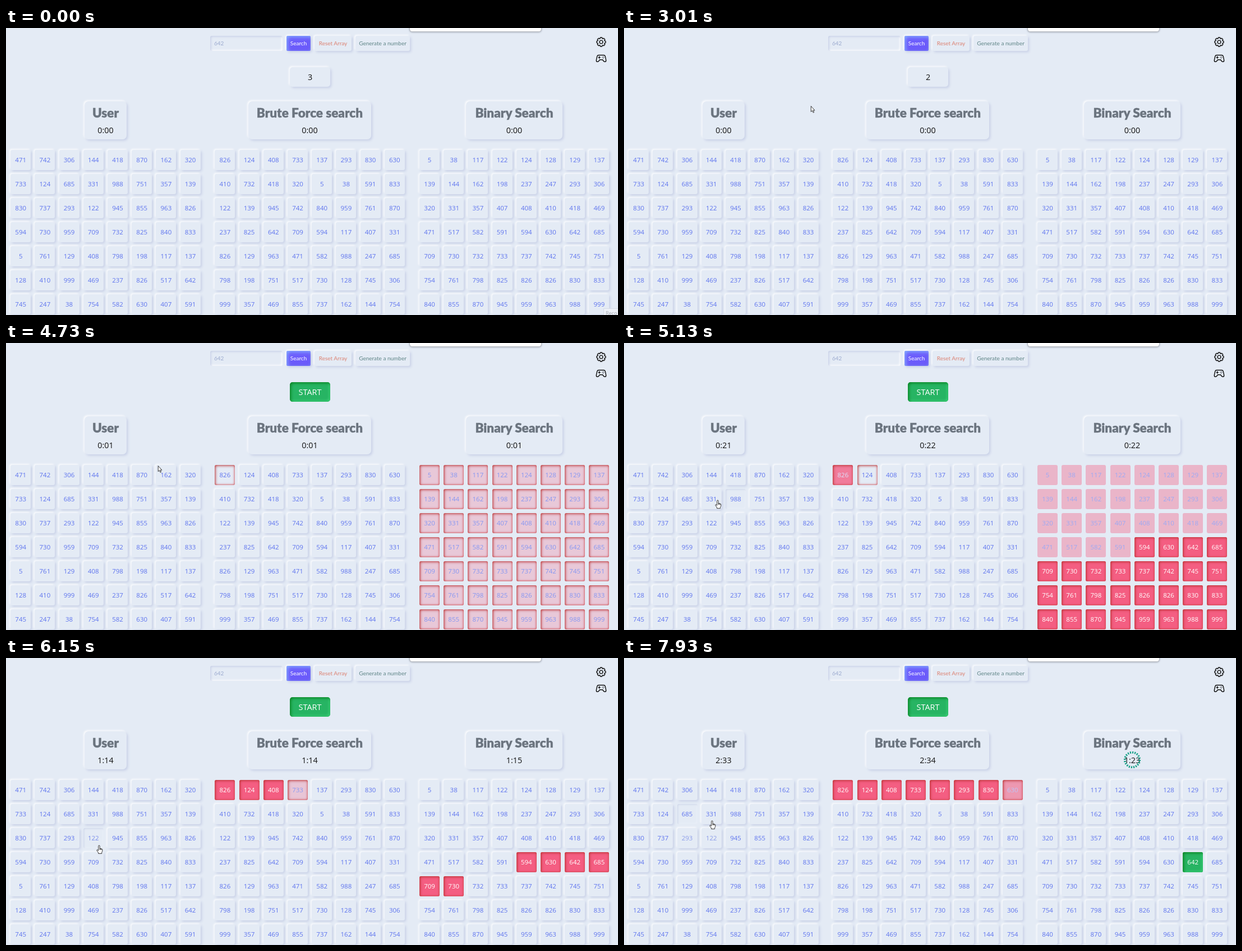
An HTML page for the animation above (7.99 s loop, 1091x513 px).

```html
<!DOCTYPE html>
<html lang="en">
<head>
<meta charset="utf-8">
<title>Search race</title>
<style>
  :root {
    --base: #e4ebf5;
    --raised: 2.2px 2.2px 4.3px #c8d0e7, -1.5px -1.5px 3.6px #fff;
    --sunk: inset 1.5px 1.5px 3.6px #c8d0e7, inset -1.5px -1.5px 3.6px #fff;
    --pressed: inset 1px 1px 3px #cdd5e9, inset -1px -1px 3px #eef3fa;
    --red: inset 1.5px 1.5px 4px rgba(184, 48, 47, .85), inset -1px -1px 3.5px rgba(214, 74, 80, .65);
    --green: inset 1.8px 1.8px 5px #08801f, inset -1.5px -1.5px 4px #43d982;
  }
  html, body { margin: 0; width: 100%; height: 100%; overflow: hidden; background: var(--base); }
  #stage {
    position: relative; width: 1091px; height: 513px; overflow: hidden;
    background: var(--base); font-family: "Open Sans", "Noto Sans", sans-serif;
  }
  #stage > * { position: absolute; box-sizing: border-box; }
  .btn {
    top: 14px; height: 27px; border-radius: 3px; text-align: center;
    font: 10px/27px Lato, "Open Sans", sans-serif; box-shadow: var(--raised);
  }
  #input { left: 364px; width: 129px; padding-left: 7px; text-align: left; color: #9baacf; box-shadow: var(--sunk); }
  #search { left: 500px; width: 43px; color: #fff; }
  #reset { left: 550px; width: 66px; color: #dc8272; }
  #gen { left: 623px; width: 97px; color: #5f8587; }
  #count {
    left: 506px; top: 70px; width: 72px; height: 35px; border-radius: 5px;
    font-size: 14.4px; line-height: 36px; text-align: center; color: #111;
  }
  .card { top: 131px; height: 68px; border-radius: 7px; text-align: center; box-shadow: var(--raised); }
  .card b {
    display: block; height: 42px; white-space: nowrap; color: #6b747f;
    font: 900 22.5px/41px Lato, "Open Sans", sans-serif; -webkit-text-stroke: .4px #6b747f;
  }
  .card span { display: block; font-size: 14.3px; line-height: 20px; color: #111; }
  .cell {
    width: 36px; height: 36px; border-radius: 3px; text-align: center;
    font-size: 11.5px; line-height: 35.5px;
  }
  #bar {
    left: 719px; top: -10px; width: 236px; height: 17px; background: #fff;
    border: 1px solid #b5b9c0; border-radius: 5px; box-shadow: 0 1px 3px #a9b0bb;
  }
  #tip {
    left: 1065px; top: 501px; width: 30px; height: 20px; padding-left: 3px;
    background: #edf1f8; border: 1px solid #d5dbe5; color: #a3a8b0; font-size: 9px; line-height: 16px;
  }
  svg { left: 0; top: 0; overflow: visible; }
</style>
</head>
<body>
<div id="stage">
  <div id="bar"></div>
  <div class="btn" id="input">642</div>
  <div class="btn" id="search">Search</div>
  <div class="btn" id="reset">Reset Array</div>
  <div class="btn" id="gen">Generate a number</div>
  <div id="count">3</div>
  <div class="card" style="left:140px;width:75px"><b>User</b><span></span></div>
  <div class="card" style="left:432px;width:219px"><b>Brute Force search</b><span></span></div>
  <div class="card" style="left:820px;width:172px"><b>Binary Search</b><span></span></div>
  <div id="tip">Reco</div>
  <svg width="1091" height="513" fill="none">
    <g stroke="#111" stroke-width="1.4" stroke-linejoin="round" stroke-linecap="round">
      <path id="gear"/>
      <circle cx="1061" cy="25" r="2.9"/>
      <path d="M1056.5 48.5h9q2 0 2.7 2l1.4 6.5q.5 3-1.7 3.4-1.5.2-2.7-1.4l-1.7-2.2h-5l-1.7 2.2q-1.2 1.6-2.7 1.4-2.2-.4-1.7-3.4l1.4-6.5q.7-2 2.7-2zM1056 52.6h3.4M1057.7 50.9v3.4"/>
      <path d="M1063 52.6h.1M1066 52.6h.1M1064.5 51.1h.1M1064.5 54.1h.1" stroke-width="1.2"/>
    </g>
    <circle id="ring" cx="906" cy="182" pathLength="20"/>
    <g id="cursor" fill="#fff" stroke="#222" stroke-width=".9" stroke-linejoin="round">
      <path id="arrow" d="M.5.5V10.6L2.8 8.5 4.4 12.2 5.9 11.5 4.3 8H7.2Z"/>
      <path id="hand" d="M-1.2 1.2a1.2 1.2 0 0 1 2.4 0V5.4Q5.6 5.6 5.8 7.2V10.4L4.7 12.6V14.6H-1.3V13L-4 9.2Q-4.3 7.7-3 7.7L-1.2 9.4ZM1.2 5.4V8M2.8 5.8V8M4.4 6.3V8"/>
    </g>
  </svg>
</div>
<script>
const LOOP = 7990, PITCH = 43.2;
const GO = 4310, ALL_ON = 4535, START = 4710, FOUND = 6340;
const $ = id => document.getElementById(id);
const stage = $('stage'), timers = document.querySelectorAll('.card span');

const BASE = [228, 235, 245], BLUE = [94, 116, 238], WHITE = [255, 255, 255], INK = [17, 17, 17];
const RED = [244, 94, 130], GREEN = [39, 180, 99], PALE = [176, 188, 228];
const mix = (a, b, p) => a.map((v, i) => v + (b[i] - v) * p);
const rgb = c => `rgb(${c.map(Math.round)})`;
const clamp = v => Math.min(1, Math.max(0, v));
const ease = (dt, dur = 600) => { const p = clamp(dt / dur); return p * p * (3 - 2 * p); };

// One set of labels; the other two grids are a shuffle and a sort of it
const nums = `826 124 408 733 137 293 830 630 410 732 418 320 5 38 591 833
  122 139 945 742 840 959 761 870 237 825 642 709 594 117 407 331
  826 129 963 471 582 988 247 685 798 198 751 517 730 128 745 306
  999 357 469 855 737 162 144 754`.split(/\s+/);
const sorted = [...nums].sort((a, b) => a - b);

function shuffle(list, seed) {
  const out = [...list];
  for (let i = out.length - 1; i > 0; i--) {
    seed = (seed * 16807) % 2147483647;
    const j = seed % (i + 1);
    [out[i], out[j]] = [out[j], out[i]];
  }
  return out;
}

function makeGrid(list, left) {
  return list.map((n, i) => {
    const el = document.createElement('div');
    el.className = 'cell';
    el.textContent = n;
    el.style.left = left + (i % 8) * PITCH + 'px';
    el.style.top = 217.5 + (i >> 3) * 43.15 + 'px';
    stage.insertBefore(el, $('tip'));
    return el;
  });
}
const user = makeGrid(shuffle(nums, 642), 8.2);
const brute = makeGrid(nums, 372.4);
const binary = makeGrid(sorted, 737);

// Run the binary search once, noting when each cell drops out
const goal = sorted.indexOf('642'), leaves = sorted.map(() => FOUND);
for (let lo = 0, hi = sorted.length - 1, step = 4880; ; step += 320) {
  const mid = (lo + hi) >> 1;
  if (mid === goal) break;
  const [from, to] = mid < goal ? [lo, mid] : [mid, hi];
  leaves.fill(step, from, to + 1);
  if (mid < goal) lo = mid + 1; else hi = mid - 1;
}

function paint(el, fill, text, shadow) {
  const key = fill + text + shadow;
  if (el.key === key) return;
  el.key = key;
  el.style.background = rgb(fill);
  el.style.color = rgb(text);
  el.style.boxShadow = shadow === 'none' ? shadow : `var(--${shadow})`;
}
const paintRed = (el, p, shadow) => paint(el, mix(BASE, RED, p), mix(BLUE, WHITE, p), shadow);

// Key points of the pointer: time, x, y
const path = [
  [70, 1072, 500], [600, 434, 170], [810, 566, 107], [1230, 511, 25], [2310, 511, 25],
  [2700, 302, 148], [3010, 333, 139], [3500, 279, 214], [4050, 314, 176], [GO, 314, 176],
  [4730, 271, 219], [5130, 167, 281], [6150, 166, 335], [6780, 152, 330], [7930, 157, 291]
];
function pointer(t) {
  const i = path.findIndex(p => p[0] > t);
  if (i < 0) return path[path.length - 1].slice(1);
  if (i === 0) return path[0].slice(1);
  const a = path[i - 1], b = path[i];
  return mix(a, b, (t - a[0]) / (b[0] - a[0])).slice(1);
}

// User cells the pointer crosses
const hovers = [
  { cell: 12, from: 4960, to: 5250 },
  { cell: 19, from: 6000, to: 6500, fades: true },
  { cell: 18, from: 7100, to: 7500, fades: true },
  { cell: 10, from: 7650, to: LOOP }
];

function drawCells(t) {
  user.forEach((el, i) => {
    const h = hovers.find(h => h.cell === i);
    const held = h && t >= h.from && t < h.to;
    const p = h && h.fades ? .55 * ease(t - h.from, 250) : 0;
    paint(el, BASE, mix(BLUE, PALE, p), held ? 'pressed' : 'raised');
  });
  brute.forEach((el, i) => {
    const dt = t - START - 412 * i;
    paintRed(el, ease(dt), dt >= 0 ? 'red' : 'raised');
  });
  binary.forEach((el, i) => {
    const out = t - leaves[i], level = ease(Math.min(t, leaves[i]) - ALL_ON);
    if (out < 0) paintRed(el, level, t >= ALL_ON ? 'red' : 'raised');
    else if (i === goal) paint(el, mix(RED, GREEN, ease(out, 350)), WHITE, 'green');
    else paintRed(el, level * (1 - ease(out)), out < 350 ? 'none' : 'raised');
  });
}

// Ticks at 60 to the second, slowing a little later on
function ticks(t, lead) {
  const dt = t - START;
  if (dt <= 0) return 0;
  return Math.floor(lead + Math.min(dt, 1440) * .05174 + Math.max(dt - 1440, 0) * .0445);
}

function drawHeader(t) {
  const go = t >= GO, left = 3 - Math.max(0, Math.floor((t - GO) / 1000) + 3);
  $('count').textContent = go ? 'START' : left;
  paint($('count'), mix(BASE, GREEN, ease(t - GO, 250)), go ? WHITE : INK, go ? 'green' : 'raised');
  [ticks(t, 0), ticks(t, .4), ticks(Math.min(t, FOUND), .6)].forEach((v, i) => {
    timers[i].textContent = Math.floor(v / 60) + ':' + String(v % 60).padStart(2, '0');
  });
  const press = Math.sin(Math.PI * clamp((t - 1480) / 310));
  $('search').style.background = rgb(mix([109, 93, 252], [91, 50, 238], press));
  $('search').style.boxShadow =
    `inset 1.5px 1.5px 7px rgba(138,189,255,${1 - .6 * press}), inset -1.5px -1.5px 7px rgba(91,46,235,.6), var(--raised)`;
  $('tip').style.opacity = 1 - clamp((t - 60) / 100);
}

function drawRing(t) {
  const dt = t - FOUND, ring = $('ring');
  ring.style.display = dt < 0 ? 'none' : '';
  if (dt < 0) return;
  const p = clamp(dt / 1500), dash = .2 + .32 * p;
  ring.setAttribute('r', 17.6 - 4.4 * p);
  ring.setAttribute('stroke-width', .6 + 3.2 * p);
  ring.setAttribute('stroke-dasharray', `${dash} ${1 - dash}`);
  ring.setAttribute('stroke', rgb(mix([150, 160, 175], [22, 160, 133], p)));
}

function drawCursor(t) {
  const [x, y] = pointer(t);
  const hand = y < 42 || t > 4780;
  $('cursor').style.display = t < 70 ? 'none' : '';
  $('cursor').setAttribute('transform', `translate(${x} ${y})`);
  $('hand').style.display = hand ? '' : 'none';
  $('arrow').style.display = hand ? 'none' : '';
}

let gear = '';
for (let k = 0; k < 8; k++) {
  [[-.31, 6.4], [-.2, 8.1], [.2, 8.1], [.31, 6.4]].forEach(([da, r]) => {
    const a = k * Math.PI / 4 + da;
    gear += `${gear ? 'L' : 'M'}${1061 + r * Math.cos(a)} ${25 + r * Math.sin(a)}`;
  });
}
$('gear').setAttribute('d', gear + 'Z');

function frame() {
  const t = performance.now() % LOOP;
  drawCells(t);
  drawHeader(t);
  drawRing(t);
  drawCursor(t);
  requestAnimationFrame(frame);
}
frame();
</script>
</body>
</html>
```
